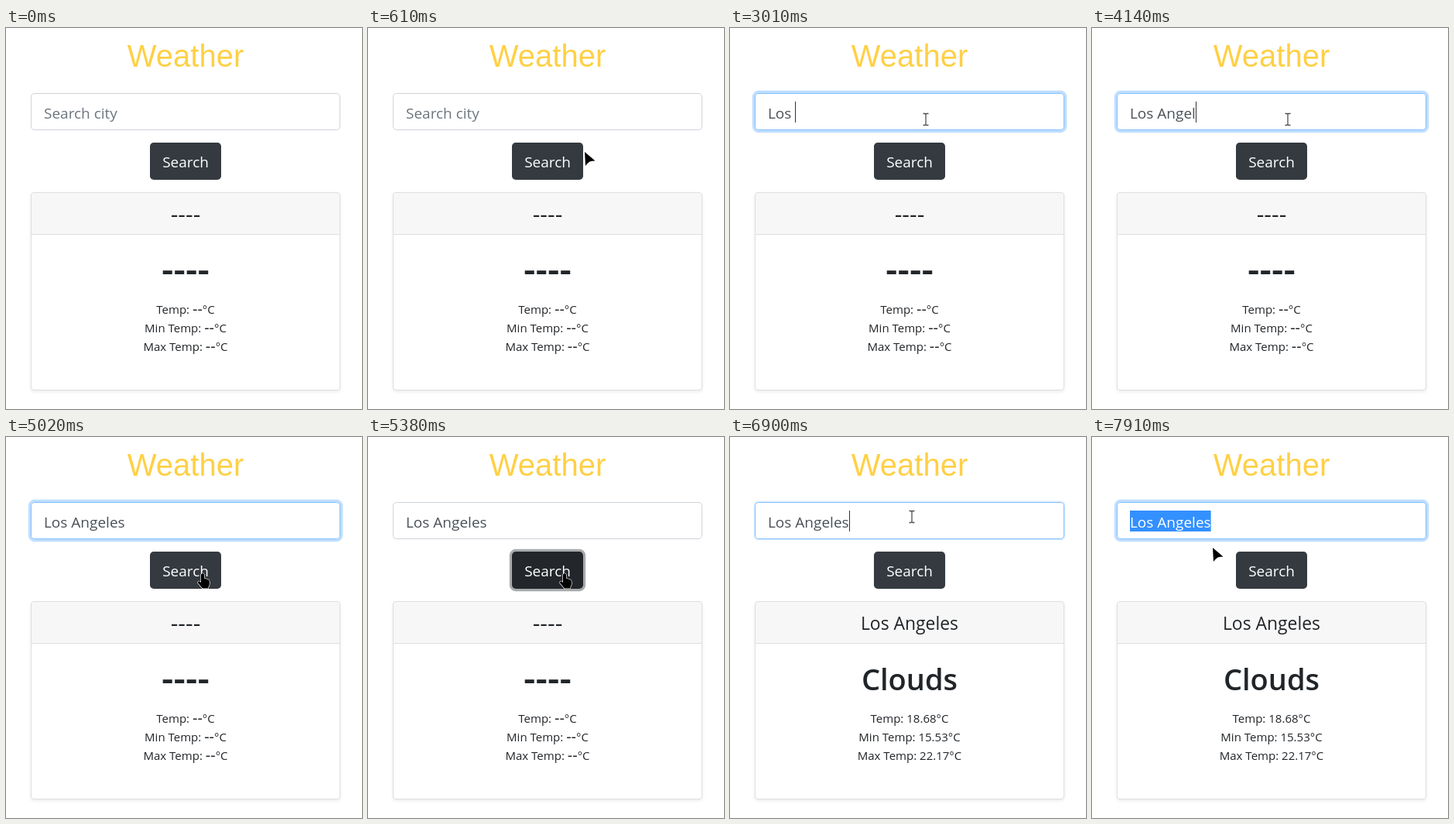
Write an HTML page that moves like this. It is 460 px wide and 492 px high and loops after 8000 ms.

```html
<!DOCTYPE html>
<html lang="en">
<head>
<meta charset="utf-8">
<title>Weather</title>
<style>
html, body { margin: 0; width: 100%; height: 100%; overflow: hidden; background: #fff; }
svg { display: block; width: 460px; height: 492px; }
text { font-family: "Open Sans", "Noto Sans", sans-serif; fill: #212529; white-space: pre; }
.mid { text-anchor: middle; }
.title { font: 40px "Liberation Sans", Arial, sans-serif; fill: #ffd045; }
.field { font-size: 19px; }
.city { font-size: 22.9px; }
.sky { font-size: 38px; font-weight: 600; }
.info { font-size: 15px; }
.pointer { fill: #000; stroke: #fff; stroke-width: 1.2; paint-order: stroke; stroke-linejoin: round; }
</style>
</head>
<body>
<svg viewBox="0 0 460 492">
  <defs>
    <filter id="soft" x="-5%" y="-5%" width="110%" height="112%"><feGaussianBlur stdDeviation="2"/></filter>
  </defs>
  <text class="mid title" x="232" y="50">Weather</text>

  <rect id="inputRing" fill="none"/>
  <rect id="input" x="32.5" y="84.5" width="399" height="47" rx="4.3" fill="#fff"/>
  <rect id="mark" y="95" height="27" fill="#3390ff"/>
  <text id="query" class="field" x="49" y="117"></text>
  <rect id="caret" y="95" width="1" height="27" fill="#333"/>

  <rect id="buttonRing" fill="none"/>
  <rect id="button" x="186" y="148" width="92" height="48" rx="4.8"/>
  <text class="mid field" x="232" y="180" style="fill:#fff">Search</text>

  <rect x="32" y="214" width="400" height="256" rx="4" opacity=".075" filter="url(#soft)"/>
  <rect x="32.5" y="212.5" width="399" height="255" rx="3.5" fill="#fff"/>
  <path d="M33 266V216q0-3 3-3H428q3 0 3 3V266Z" fill="#f7f7f7"/>
  <path d="M33 266.5H431" stroke="#dfdfdf"/>
  <rect x="32.5" y="212.5" width="399" height="255" rx="3.5" fill="none" stroke="#dfdfdf"/>
  <g id="report"></g>

  <g id="cursor">
    <path id="beam" d="M-3.5-7.5H-1L0-6.5L1-7.5H3.5M0-6.5V6.5M-3.5 7.5H-1L0 6.5L1 7.5H3.5" fill="none" stroke="#505050" stroke-width="1.3"/>
    <path id="arrow" class="pointer" d="M0 0L13.5 11.5Q10 11.5 6.5 12.5Q3.5 14.5 1 18Z"/>
    <path id="hand" class="pointer" d="M-2 1.5Q0-1.5 2 1.5V6.5L7 8Q9 9 9 11V14L7 19.5H0L-6 12.5Q-6 9.5-3.5 10.5L-2 12Z"/>
  </g>
</svg>
<script>
const $ = id => document.getElementById(id);
const set = (id, attrs) => { for (const k in attrs) $(id).setAttribute(k, attrs[k]); };
const LOOP = 8000, CITY = "Los Angeles", LEFT = 49;

// Each step overrides part of the state from its time on.
// cur: [shape, x, y]; ring, press: focus strength; hover: button shade; sel: selection start
const steps = [
  [0, { n: 0, caret: 0, ring: 0, press: 0, hover: 0, sel: -1, done: 0, cur: null }],
  [250, { cur: ["arrow", 432, 470] }],
  [370, { cur: ["arrow", 418, 370] }],
  [490, { cur: ["arrow", 342, 262] }],
  [610, { cur: ["arrow", 280, 160] }],
  [740, { cur: ["beam", 253, 118] }],
  [860, { ring: .1, caret: 1 }],
  [1000, { ring: 1 }],
  [1380, { caret: 0 }],
  [1880, { caret: 1 }],
  [2380, { n: 1 }],
  [2630, { n: 2 }],
  [2880, { n: 3 }],
  [3010, { n: 4 }],
  [3510, { n: 5 }],
  [3760, { n: 7 }],
  [4010, { n: 8 }],
  [4140, { n: 9 }],
  [4260, { n: 10 }],
  [4390, { n: 11 }],
  [4890, { caret: 0 }],
  [5020, { cur: ["hand", 254, 176] }],
  [5140, { hover: 1 }],
  [5260, { ring: .4, press: .6 }],
  [5380, { ring: 0, press: 1 }],
  [5900, { done: 1 }],
  [6400, { cur: ["hand", 252, 165] }],
  [6530, { cur: ["arrow", 243, 136], hover: 0 }],
  [6660, { cur: ["beam", 238, 113] }],
  [6780, { cur: ["beam", 235, 103] }],
  [6900, { ring: .5, press: .2, caret: 1 }],
  [7040, { ring: 1, press: 0, cur: ["beam", 249, 118] }],
  [7280, { caret: 0, sel: 4 }],
  [7400, { sel: 0, cur: ["beam", 250, 125] }],
  [7530, { cur: null }],
  [7910, { cur: ["arrow", 156, 143] }]
];

const line = (cls, y, text) => `<text class="mid ${cls}" x="232" y="${y}">${text}</text>`;
const dashes = (size, drop, text) =>
  `<tspan font-size="${size}" dy="${drop}">${text}</tspan>`;
const degrees = v => v
  ? v + "°C"
  : dashes(20, 1, "--") + '<tspan dy="-1">°C</tspan>';

function report(done) {
  const vals = done ? ["18.68", "15.53", "22.17"] : [];
  return line("city", 249, done ? CITY : `<tspan style="font-size:30px" dy="2">----</tspan>`) +
    line("sky", 327, done ? "Clouds" : `<tspan style="font-size:48px" dy="2">----</tspan>`) +
    ["Temp", "Min Temp", "Max Temp"].map((name, i) =>
      line("info", 369 + 24 * i, `${name}: ${degrees(vals[i])}`)).join("");
}

// Focus ring growing outward from a box
function ring(id, x, y, w, h, k, color) {
  const s = 3.2 * k;
  set(id, {
    x: x - s / 2, y: y - s / 2, width: w + s, height: h + s, rx: 4.8 + s / 2,
    stroke: color, "stroke-width": s
  });
}

function draw(s) {
  ring("inputRing", 32, 84, 400, 48, s.ring, `rgba(0,123,255,${.25 * s.ring})`);
  set("input", { stroke: s.ring ? "#80bdff" : "#ced4da" });
  ring("buttonRing", 186, 148, 92, 48, s.press, `rgba(82,88,93,${.5 * s.press})`);
  set("button", { fill: s.hover ? "#23272b" : "#343a40" });

  const q = $("query"), typed = CITY.slice(0, s.n);
  q.style.fill = typed ? "#495057" : "#6c757d";
  q.textContent = typed || "Search city";
  const width = i => i > 0 ? q.getSubStringLength(0, i) : 0;
  const end = width(s.n), from = width(s.sel);
  set("caret", { x: Math.round(LEFT + end), opacity: s.caret });
  set("mark", { x: LEFT + from, width: s.sel < 0 ? 0 : end - from });
  if (s.sel >= 0)
    q.innerHTML = `${typed.slice(0, s.sel)}<tspan fill="#fff">${typed.slice(s.sel)}</tspan>`;

  $("report").innerHTML = report(s.done);

  const [shape, x, y] = s.cur || ["", 0, 0];
  set("cursor", { transform: `translate(${x} ${y})` });
  for (const id of ["beam", "arrow", "hand"])
    set(id, { visibility: id === shape ? "visible" : "hidden" });
}

let shown = 0;
function tick() {
  const t = performance.now() % LOOP;
  const past = steps.filter(([at]) => at <= t);
  if (past.length !== shown) {
    shown = past.length;
    draw(Object.assign({}, ...past.map(p => p[1])));
  }
  requestAnimationFrame(tick);
}
tick();
</script>
</body>
</html>
```
